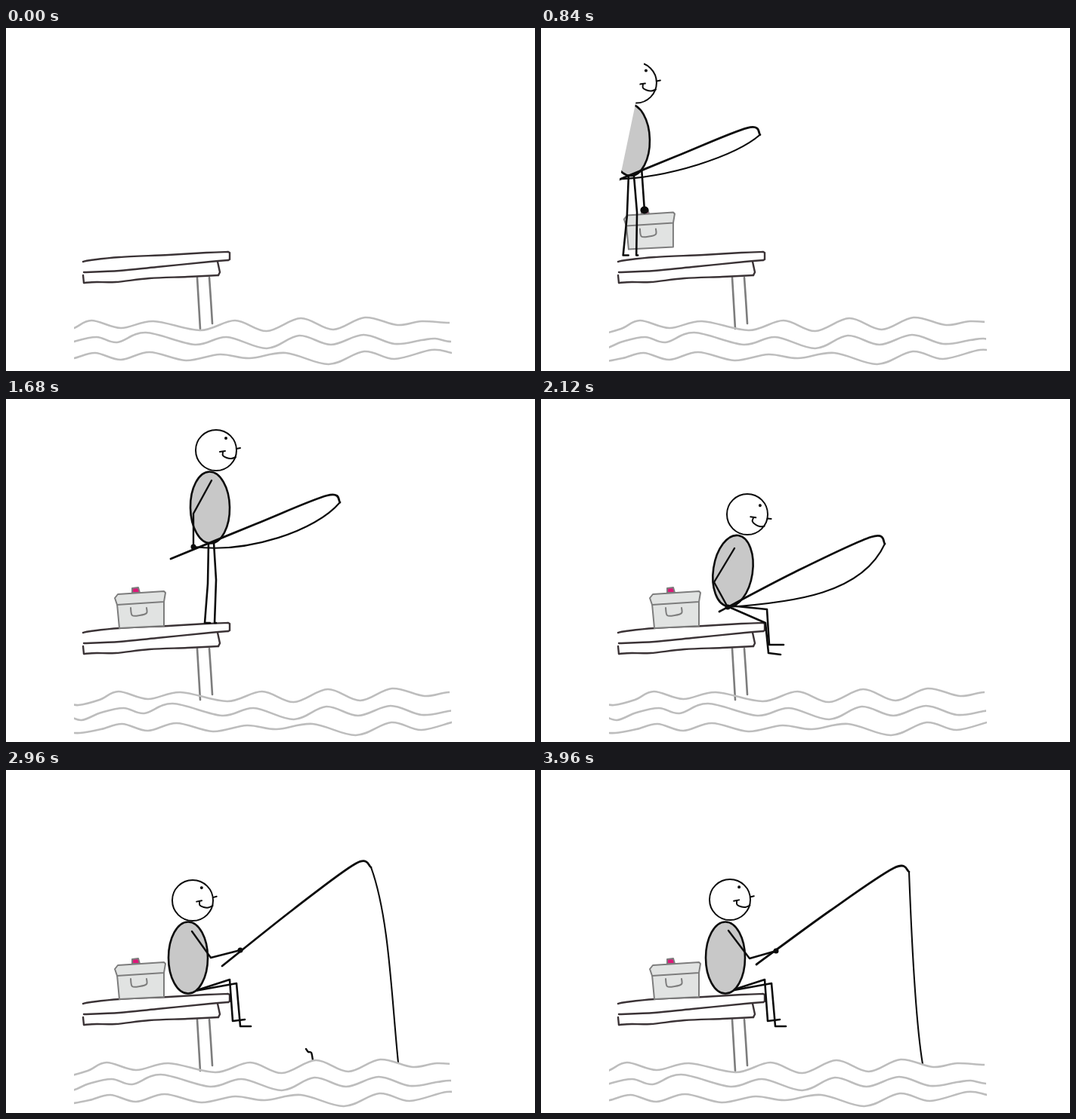
Animation of 700 by 455 pixels, one loop 4000 ms. Source, as an HTML page with a canvas:

```html
<!DOCTYPE html>
<html lang="en">
<head>
<meta charset="utf-8">
<title>Gone fishing</title>
<style>
  html, body { margin: 0; width: 100%; height: 100%; overflow: hidden; background: #fff; }
  canvas { display: block; }
</style>
</head>
<body>
<canvas id="stage" width="700" height="455"></canvas>
<script>
const ctx = document.getElementById('stage').getContext('2d');
const LOOP = 4000, STEP = 40;
const INK = '#0c0c0c', WOOD = '#3b3336', GREY = '#7d7d7d', WATER = '#bdbdbd';

// Poses: points as x, y pairs; lean holds the face and torso angles in degrees.
const stand = {
  head: [278, 68], torso: [270, 144], lean: [0, -1],
  arm: [272, 108, 248, 152, 248, 196], spareArm: [280, 150, 280, 172],
  legA: [268, 191, 267, 245, 263, 297, 270, 297],
  legB: [275, 191, 278, 240, 276, 297, 278, 297],
  rod: [218, 212, 330, 166, 425, 128, 442, 137],
  line: [410, 175, 320, 205, 248, 196]
};
const carry = { ...stand, spareArm: [283, 150, 289, 237], line: [410, 165, 320, 195, 248, 196] };
const bend = {
  head: [191, 115], torso: [149, 178], lean: [45, 14],
  arm: [154, 143, 118, 182, 109, 224], spareArm: [167, 180, 171, 252],
  legA: [133, 222, 160, 262, 128, 305, 140, 306],
  legB: [140, 222, 175, 262, 160, 302, 170, 302],
  rod: [109, 224, 205, 204, 297, 192, 313, 205],
  line: [280, 238, 190, 245, 109, 227]
};
const sit = {
  head: [273, 153], torso: [254, 228], lean: [16, 8.5],
  arm: [256, 198, 229, 243, 247, 276], spareArm: [258, 220, 254, 250],
  legA: [249, 274, 299, 279, 302, 326, 321, 326],
  legB: [249, 276, 297, 297, 301, 337, 317, 339],
  rod: [236, 282, 335, 230, 437, 183, 455, 192],
  line: [425, 258, 335, 270, 247, 276]
};
const fish = {
  head: [247, 173], torso: [241, 249], lean: [-4, 0],
  arm: [246, 214, 271, 249, 310, 239], spareArm: [243, 220, 243, 250],
  legA: [250, 293, 296, 278, 300, 333, 316, 331],
  legB: [250, 293, 305, 283, 310, 340, 324, 340],
  rod: [286, 260, 380, 185, 463, 124, 483, 129],
  line: [507, 195, 510, 300, 519, 388]
};
const swingBack = {
  ...fish, lean: [-8, -4], arm: [244, 214, 258, 247, 274, 232],
  rod: [272, 255, 276, 150, 262, 30, 248, 22], line: [215, 0, 180, 60, 175, 140]
};
const swingOut = {
  ...fish, rod: [286, 260, 385, 188, 468, 124, 487, 130], line: [540, 60, 600, 110, 620, 190]
};
const splash = { ...fish, line: [530, 170, 560, 280, 545, 388] };
const settle = {
  ...fish, head: [250, 172], torso: [244, 249], lean: [-3, 0],
  arm: [248, 213, 276, 250, 311, 240],
  rod: [285, 258, 382, 187, 467, 130, 487, 135], line: [493, 205, 500, 320, 511, 389]
};
const wait = { ...settle, line: [490, 215, 495, 330, 505, 390] };

// Moves a pose along the slightly sloping dock.
function shift(pose, dx) {
  const moved = {};
  for (const part in pose)
    moved[part] = part === 'lean' ? pose.lean
      : pose[part].map((v, i) => v + (i % 2 ? -dx * 0.03 : dx));
  return moved;
}

// time, pose, number of strides taken on the way to the next key
const keys = [
  [0, shift(carry, -331), 6],
  [1000, shift(carry, -118)],
  [1150, bend],
  [1220, bend],
  [1360, shift(stand, -118), 4],
  [1640, stand],
  [1720, stand],
  [1960, sit],
  [2120, sit],
  [2260, swingBack],
  [2400, swingBack],
  [2560, swingOut],
  [2740, splash],
  [2960, fish],
  [3380, settle],
  [3920, wait],
  [LOOP, wait]
];

const waves = [
  [587, [45, 403, 60, 406, 88, 399, 113, 388, 152, 398, 195, 389, 257, 401, 303, 388,
    345, 402, 390, 385, 433, 400, 475, 384, 518, 394, 550, 389, 587, 391, 615, 388]],
  [589, [45, 419, 64, 426, 90, 416, 120, 410, 147, 417, 185, 404, 250, 420, 292, 410,
    345, 425, 388, 408, 430, 420, 473, 407, 514, 419, 550, 414, 568, 412, 589, 416, 620, 412]],
  [590, [45, 442, 62, 443, 90, 438, 118, 431, 152, 440, 190, 430, 238, 441, 283, 433,
    322, 438, 370, 431, 427, 446, 474, 429, 514, 439, 563, 427, 590, 431, 620, 437]]
];

function pen(color, width) {
  ctx.strokeStyle = color;
  ctx.lineWidth = width;
}

function poly(p, fill) {
  ctx.beginPath();
  for (let i = 0; i < p.length; i += 2) ctx.lineTo(p[i], p[i + 1]);
  if (fill) {
    ctx.closePath();
    ctx.fillStyle = fill;
    ctx.fill();
  }
  ctx.stroke();
}

// Smooth stroke through all points.
function curve(p) {
  const n = p.length / 2;
  const at = i => { const k = 2 * Math.max(0, Math.min(n - 1, i)); return [p[k], p[k + 1]]; };
  ctx.beginPath();
  ctx.moveTo(p[0], p[1]);
  for (let i = 0; i < n - 1; i++) {
    const [a, b, c, d] = [at(i - 1), at(i), at(i + 1), at(i + 2)];
    ctx.bezierCurveTo(b[0] + (c[0] - a[0]) / 6, b[1] + (c[1] - a[1]) / 6,
      c[0] - (d[0] - b[0]) / 6, c[1] - (d[1] - b[1]) / 6, c[0], c[1]);
  }
  ctx.stroke();
}

function oval(x, y, rx, ry, fill, angle = 0) {
  ctx.beginPath();
  ctx.ellipse(x, y, rx, ry, angle * Math.PI / 180, 0, 2 * Math.PI);
  ctx.fillStyle = fill;
  ctx.fill();
}

function poseAt(t) {
  let i = 0;
  while (i < keys.length - 2 && t >= keys[i + 1][0]) i++;
  const [start, from, strides] = keys[i], [end, to] = keys[i + 1];
  const u = (t - start) / (end - start);
  const e = strides ? u : u * u * (3 - 2 * u);
  const pose = {};
  for (const part in from) pose[part] = from[part].map((v, k) => v + (to[part][k] - v) * e);
  if (strides) {
    const swing = 18 * Math.sin(Math.PI * strides * u);
    [[pose.legA, swing], [pose.legB, -swing]].forEach(([leg, s]) => {
      leg[2] += s / 2;
      leg[4] += s;
      leg[6] += s;
    });
  }
  return pose;
}

function drawDock() {
  pen(GREY, 2.6);
  curve([253, 331, 255, 365, 257, 399]);
  curve([269, 331, 271, 360, 273, 392]);
  pen(WOOD, 2.4);
  curve([102, 310, 112, 308, 150, 304, 215, 301, 265, 298, 294, 297]);
  poly([294, 297, 296, 298, 296, 307, 294, 308]);
  curve([294, 308, 270, 310, 200, 317, 150, 322, 103, 324]);
  poly([280, 310, 283, 324, 281, 328]);
  curve([281, 328, 240, 330, 190, 332, 145, 337, 120, 337, 103, 338]);
  poly([103, 338, 102, 328]);
}

function drawToolbox(dx, dy) {
  ctx.save();
  ctx.translate(dx, dy);
  pen(GREY, 2);
  poly([167, 257, 167, 251, 175, 250, 177, 257], '#dc1878');
  poly([147, 272, 150, 304, 209, 301, 209, 268], '#e1e3e2');
  poly([147, 273, 144, 264, 148, 259, 209, 255, 211, 257, 209, 269], '#e1e3e2');
  curve([165, 277, 167, 287, 177, 287, 186, 284, 186, 277]);
  ctx.restore();
}

function drawHead(x, y, angle) {
  pen(INK, 2);
  oval(x, y, 27, 27, '#fff');
  ctx.stroke();
  ctx.save();
  ctx.translate(x, y);
  ctx.rotate(angle * Math.PI / 180);
  oval(13, -16, 2, 2, INK);
  poly([27, -2, 32, -3]);
  poly([5, 2, 12, 1]);
  curve([9, 2, 9, 7, 14, 10, 20, 11, 26, 9]);
  ctx.restore();
}

function drawAngler(p, holdsBox) {
  pen(INK, 2.6);
  poly(p.legA);
  poly(p.legB);
  poly(p.spareArm);
  if (holdsBox) oval(p.spareArm[2], p.spareArm[3], 5.5, 5, INK);
  oval(...p.torso, 26, 47.5, '#c8c8c8', p.lean[1]);
  ctx.stroke();
  drawHead(...p.head, p.lean[0]);
  pen(INK, 2.4);
  poly(p.arm);
  oval(p.arm[4], p.arm[5], 3.5, 3.5, INK);
  pen(INK, 2.8);
  curve(p.rod);
  pen(INK, 2.1);
  ctx.beginPath();
  ctx.moveTo(p.rod[6], p.rod[7]);
  ctx.bezierCurveTo(...p.line);
  ctx.stroke();
}

function drawRipple(t) {
  if (t < 2880 || t > 3040) return;
  const dip = 15 * (1 - Math.sin(Math.PI * (t - 2880) / 160));
  ctx.save();
  ctx.beginPath();
  ctx.rect(380, 350, 45, 35);
  ctx.clip();
  pen(INK, 2.4);
  curve([397, 370 + dip, 400, 374 + dip, 404, 375 + dip, 406, 385 + dip]);
  ctx.restore();
}

function drawWaves(t) {
  const drift = 40.5 * (t < 1900 ? t / 1900 : (LOOP - t) / (LOOP - 1900));
  pen(WATER, 2.6);
  for (const [right, points] of waves) {
    ctx.save();
    ctx.beginPath();
    ctx.rect(90, 370, right - 90, 85);
    ctx.clip();
    ctx.translate(drift, 0);
    curve(points);
    ctx.restore();
  }
}

function draw(t) {
  ctx.clearRect(0, 0, 700, 455);
  ctx.lineCap = ctx.lineJoin = 'round';
  drawDock();

  // The angler enters from behind a slanted paper edge.
  ctx.save();
  ctx.beginPath();
  [[146, 0], [700, 0], [700, 455], [51, 455]].forEach(q => ctx.lineTo(...q));
  ctx.clip();
  if (t > 0) {
    const pose = poseAt(t), carried = t < 1150;
    drawToolbox(carried ? pose.spareArm[2] - 171 : 0, carried ? pose.spareArm[3] - 252 : 0);
    drawAngler(pose, t <= 1220);
  }
  ctx.restore();

  drawRipple(t);
  drawWaves(t);
}

const begin = performance.now();
function frame() {
  const t = Math.max(0, performance.now() - begin) % LOOP;
  draw(Math.floor(t / STEP) * STEP);
  requestAnimationFrame(frame);
}
frame();
</script>
</body>
</html>
```
